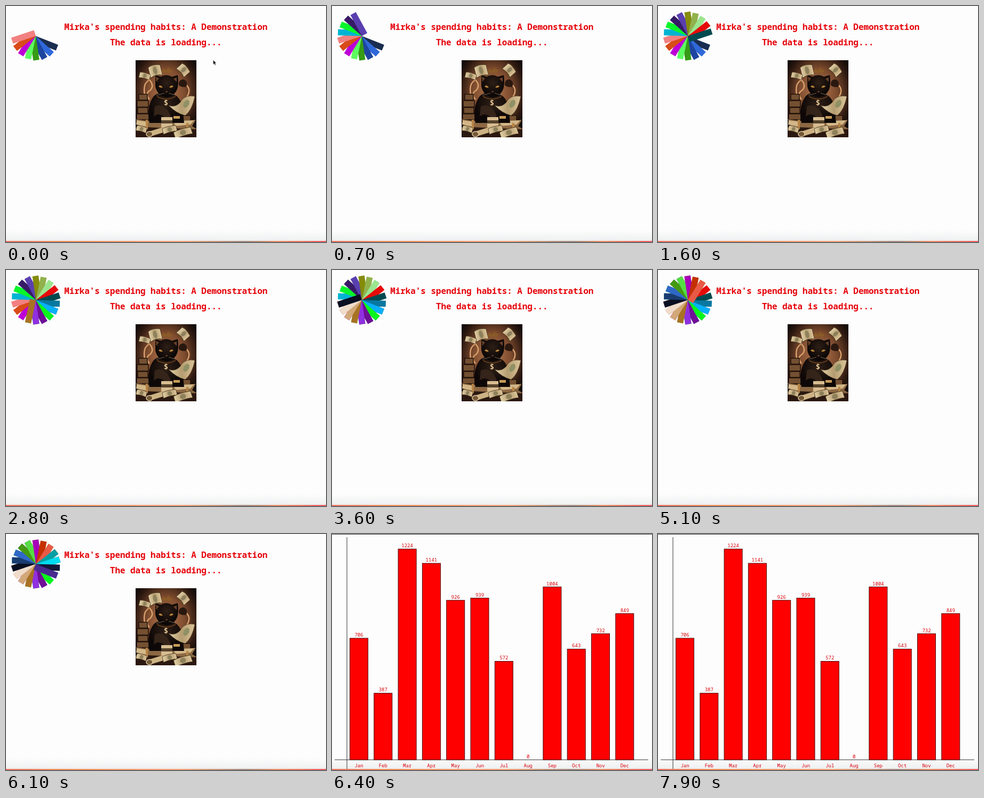
Animation, 600 px wide and 444 px high, one loop 8 s. Source, as an HTML page:

```html
<!DOCTYPE html>
<html lang="en">
<head>
<meta charset="utf-8">
<title>Spending habits</title>
<style>
  html, body { margin: 0; width: 100%; height: 100%; overflow: hidden; background: #fdfdfd; }
  svg { display: block; width: 600px; height: 444px; }
  text { font-family: "Noto Sans Mono", "DejaVu Sans Mono", monospace; text-anchor: middle; }
  .title { font-size: 15.88px; font-weight: 600; fill: #e60008; }
  .label { font-size: 9px; font-weight: 500; fill: #d80008; }
</style>
</head>
<body>
<svg viewBox="0 0 600 444">
  <defs>
    <linearGradient id="floor" x2="0" y2="1">
      <stop stop-color="#fdfdfd"/><stop offset="1" stop-color="#eeeff0"/>
    </linearGradient>
    <linearGradient id="strip">
      <stop stop-color="#f0705c"/><stop offset=".15" stop-color="#f58a58"/>
      <stop offset=".55" stop-color="#f5a070"/><stop offset=".75" stop-color="#a08a80"/>
      <stop offset=".85" stop-color="#f08a60"/><stop offset="1" stop-color="#ee5a60"/>
    </linearGradient>
    <radialGradient id="glow" cy=".42" r=".62">
      <stop stop-color="#b87a50"/><stop offset=".5" stop-color="#7d4b2e"/>
      <stop offset=".85" stop-color="#2a170f"/><stop offset="1" stop-color="#120a07"/>
    </radialGradient>
    <radialGradient id="fur" cy=".35">
      <stop stop-color="#2e1f16"/><stop offset="1" stop-color="#0d0807"/>
    </radialGradient>
    <linearGradient id="paper">
      <stop stop-color="#e3d1a8"/><stop offset=".5" stop-color="#b59c70"/><stop offset="1" stop-color="#dcc59a"/>
    </linearGradient>
    <g id="note">
      <path d="M-12-6Q-3-9 12-6V6Q0 3-12 6Z" fill="url(#paper)" stroke="#4a3720" stroke-width=".8"/>
      <ellipse cy="-1" rx="4" ry="4.3" fill="#8d815c"/>
    </g>
    <clipPath id="frame"><rect width="114" height="145"/></clipPath>
  </defs>

  <rect width="600" height="444" fill="#fdfdfd"/>
  <rect y="422" width="600" height="20" fill="url(#floor)"/>
  <rect y="442" width="600" height="2" fill="url(#strip)"/>

  <g id="loading">
    <g id="fan" transform="translate(56 56.5)"></g>
    <text class="title" x="299.7" y="45">Mirka's spending habits: A Demonstration</text>
    <text class="title" x="299.7" y="74">The data is loading...</text>
    <g transform="translate(243 102)" clip-path="url(#frame)">
      <rect width="114" height="145" fill="url(#glow)"/>
      <path d="M20 76Q10 45 26 37Q36 48 27 57Q17 62 26 74M94 72Q107 55 93 45" fill="none" stroke="#d8a06c" stroke-width="2.5"/>
      <path d="M81 47Q80 36 90 36Q99 40 95 50Q87 52 81 47Z" fill="#2a1810"/>
      <g fill="#745032" stroke="#20120b" stroke-width="1.5">
        <path d="M6 64H22V75H6ZM3 76H24V88H3ZM4 89H23V100H4ZM2 101H25V112H2Z"/>
        <path d="M86 104H103V114H86Z"/>
      </g>
      <path d="M0 111L22 114L90 116L113 112L106 124L114 129V145H0V127L7 121Z" fill="#8c6843"/>
      <path d="M0 130L20 126L70 128L114 130V145H0Z" fill="#2a1810"/>
      <path d="M2 113L24 116L20 125L1 121ZM72 114L110 113L103 121L74 124Z" fill="#d3b788"/>
      <path d="M26 118Q20 92 31 72Q36 63 45 62L71 63Q86 72 88 90L91 118Z" fill="url(#fur)"/>
      <path d="M37 49L37 28L47 31Q58 25 68 31L79 28Q81 40 79 51Q75 67 58 70Q40 66 37 49Z" fill="url(#fur)"/>
      <path d="M38 31L44 34L39 41ZM77 32L71 35L77 41Z" fill="#684128"/>
      <path d="M43 49Q47 45 51 51Q46 53 43 49ZM63 51Q67 45 71 49Q68 53 63 51Z" fill="#b9853c"/>
      <path d="M55 58H61L58 62Z" fill="#57352a"/>
      <path d="M54 62L39 66M62 62L76 66" stroke="#c0a384" stroke-width=".6"/>
      <path d="M40 68Q57 78 75 68" fill="none" stroke="#70431f" stroke-width="1.5"/>
      <path d="M36 87Q55 79 66 105L58 112Q46 95 34 106Z" fill="#35241a"/>
      <text x="57" y="85" font-size="14" font-weight="700" fill="#ecc898">$</text>
      <use href="#note" transform="translate(37 21) rotate(-14) scale(.95 1.7)"/>
      <use href="#note" transform="translate(17 30) rotate(14) scale(.85)"/>
      <use href="#note" transform="translate(89 19) rotate(48) scale(.9 1.3)"/>
      <path d="M62 85Q78 91 88 73Q97 65 111 68Q106 94 93 104Q76 100 62 85Z" fill="url(#paper)" stroke="#4a3720" stroke-width=".7"/>
      <ellipse cx="95" cy="82" rx="5" ry="8" fill="#8f9164" transform="rotate(30 95 82)"/>
      <path d="M49 23L52 16L57 20L62 13L64 19L69 17L67 24Z" fill="#8a5b26"/>
      <path d="M48 107H69V126H48Z" fill="#d8bd92"/>
      <path d="M48 113H69V119H48Z" fill="#56422b"/>
      <path d="M71 105H83V110H71Z" fill="#c79b58"/>
      <path d="M21 112V130M97 118V132" stroke="#b78446" stroke-width="4"/>
      <path d="M20 136L57 124L68 131L29 143Z" fill="#cdb284"/>
      <ellipse cx="26" cy="139" rx="6" ry="5" fill="#745939" stroke="#e0c99e" stroke-width="1.5"/>
      <use href="#note" transform="translate(64 131) rotate(-14) scale(1.1 .9)"/>
      <use href="#note" transform="translate(89 137) rotate(-18) scale(1.4 1.1)"/>
      <use href="#note" transform="translate(11 130) rotate(14) scale(.8)"/>
    </g>
    <path id="cursor" d="M388.5 101.5V110L390.4 108.3L391.8 111.4L393.2 110.8L391.9 107.8H394.4Z" fill="#111" stroke="#fff" stroke-width=".4"/>
  </g>

  <g id="chart">
    <path d="M0 .5H600" stroke="#444"/>
    <path d="M28 6V442M5 424.8H593" stroke="#333" fill="none"/>
  </g>
</svg>
<script>
const LOOP = 8000, CHART_AT = 6200;
const FIRST_ANGLE = 21.6, STEP = 20;
const byId = id => document.getElementById(id);

function add(parent, tag, attrs, text = "") {
  const node = document.createElementNS("http://www.w3.org/2000/svg", tag);
  for (const key in attrs) node.setAttribute(key, attrs[key]);
  node.textContent = text;
  return parent.appendChild(node);
}

// Blades in painting order, each one step further: [appears at ms, colour]
const blades = [
  ...["#1a2d50", "#2f68d8", "#1d459f", "#369b15", "#5cff60", "#bd00d6", "#d94b18", "#f28080"].map(c => [0, c]),
  [100, "#00b4d2"], [200, "#08f52b"], [600, "#371a66"], [700, "#5a3fb0"],
  [1000, "#858b0a"], [1100, "#91b14c"], [1300, "#9be58f"], [1500, "#e50a0a"],
  [1600, "#004a50"],
  [1800, "#0878a0"], [2000, "#08b0fa"], [2200, "#08f51c"], [2400, "#700f96"],
  [2600, "#9030e0"], [2800, "#a87224"],
  [3100, "#d2a878"], [3300, "#f0dccb"], [3600, "#0a1022"],
  [3800, "#1a3d70"], [4000, "#3068c8"], [4200, "#459a10"], [4500, "#55dd44"],
  [4700, "#a800b8"], [4900, "#c43000"], [5100, "#e85a45"],
  [5400, "#00a0a4"], [5600, "#00dcf0"], [5800, "#141838"], [6100, "#4a2a90"]
];

const fan = blades.map(([at, fill], i) => ({
  at,
  node: add(byId("fan"), "rect", {
    width: 45, height: 11.5, fill, transform: `rotate(${FIRST_ANGLE + i * STEP})`
  })
}));

const months = "Jan Feb Mar Apr May Jun Jul Aug Sep Oct Nov Dec".split(" ");
const spending = [706, 387, 1224, 1141, 926, 939, 572, 0, 1004, 643, 732, 849];
const BASE = 424.8;
spending.forEach((value, i) => {
  const chart = byId("chart"), x = 33.5 + i * 45.3, height = value * 0.324;
  if (value) add(chart, "rect", { x, y: BASE - height, width: 34, height, fill: "#f00", stroke: "#4a0808" });
  add(chart, "text", { class: "label", x: x + 17, y: BASE - height - 3 }, value);
  add(chart, "text", { class: "label", x: x + 17, y: 439 }, months[i]);
});

const show = (node, visible) => node.setAttribute("display", visible ? "inline" : "none");

function render(t) {
  show(byId("loading"), t < CHART_AT);
  show(byId("chart"), t >= CHART_AT);
  show(byId("cursor"), t < 100);
  for (const { at, node } of fan) show(node, t >= at);
}

const start = performance.now();
function tick() {
  render((performance.now() - start) % LOOP);
  requestAnimationFrame(tick);
}
tick();
</script>
</body>
</html>
```
